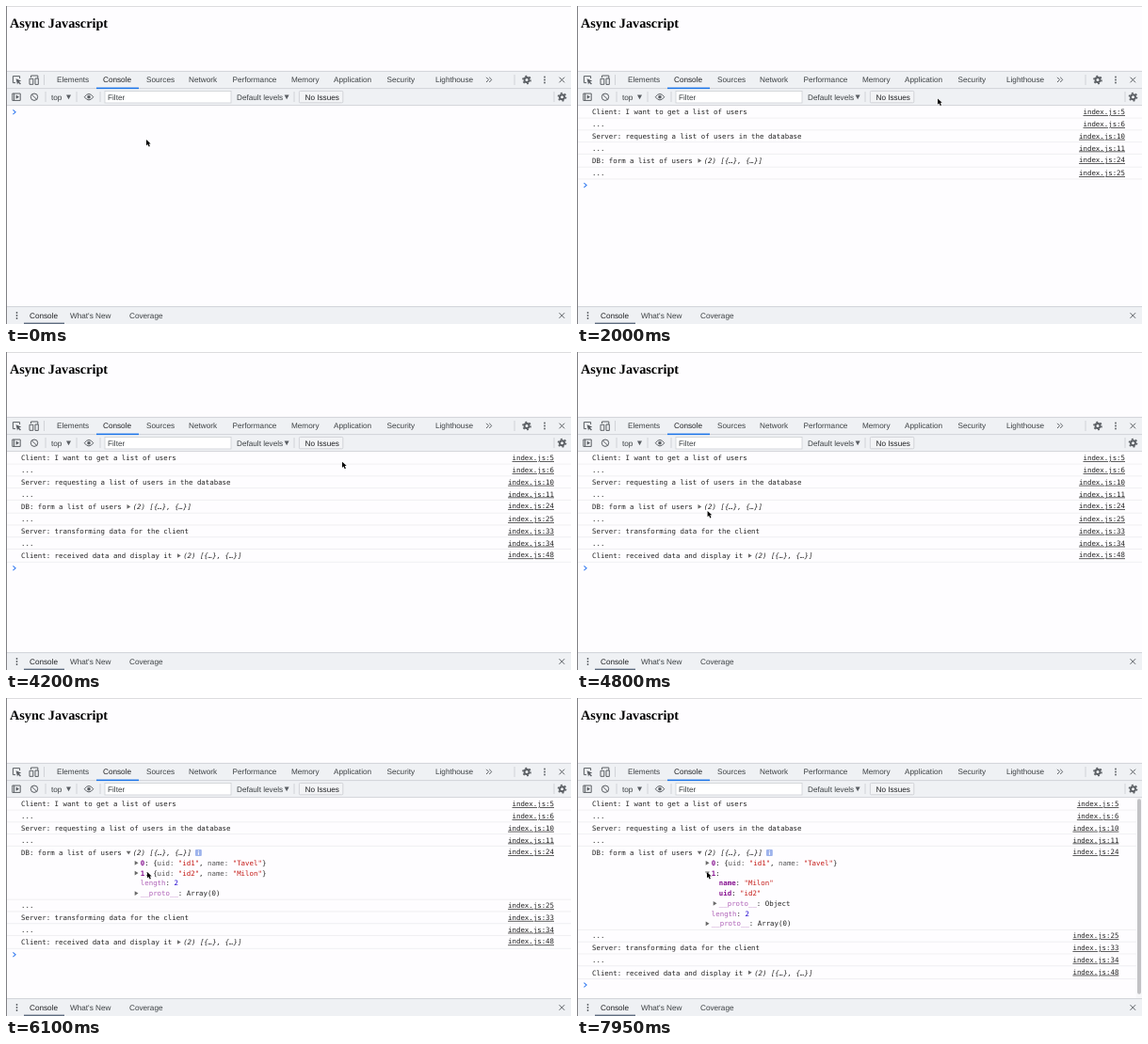
Recreate the animation shown at these times as an HTML page. Size 600 px wide and 338 px high, loop 8 s.

```html
<!DOCTYPE html>
<html lang="en">
<head>
<meta charset="utf-8">
<title>Async Javascript</title>
<style>
  html, body { margin: 0; width: 100%; height: 100%; overflow: hidden; background: #fefdff; }
  svg { display: block; width: 600px; height: 338px; }
  text { white-space: pre; text-rendering: geometricPrecision; }
  .ui { font: 8.2px "Liberation Sans", Arial, sans-serif; fill: #3c4043; }
  .ui .on { fill: #202124; }
  .mono { font: 7.4px "DejaVu Sans Mono", monospace; fill: #242424; }
  .it { font-style: italic; }
  .key { fill: #881391; font-weight: bold; }
  .dim { fill: #b064b8; }
  .sub { fill: #565656; }
  .str { fill: #c41a16; }
  .num { fill: #1c00cf; }
  .link { text-anchor: end; text-decoration: underline; }
  .icon { fill: none; stroke: #5a5e63; stroke-width: 1; }
  .solid { fill: #5a5e63; }
  .rule { stroke: #c9ccd1; stroke-width: .8; }
</style>
</head>
<body>
<svg viewBox="0 0 600 338">
  <rect width="600" height="338" fill="#fefdff"/>
  <rect width="600" height="1" fill="#dcdcde"/>
  <text x="4" y="23" font-family="'Liberation Serif', Times, serif" font-weight="bold" font-size="14.25">Async Javascript</text>
  <g id="log" class="mono"></g>
  <g id="chrome" class="ui"></g>
  <rect width="1" height="338" fill="#808084"/>
  <g id="pointer"></g>
</svg>
<script>
const LOOP = 8000, OPEN_ARRAY = 5300, OPEN_ITEM = 7400;
const $ = id => document.getElementById(id);

// Toolbars
const label = (x, y, s, cls = '') => `<text x="${x}" y="${y}" class="${cls}">${s}</text>`;
const box = (x, y, w, h, fill, extra = '') => `<rect x="${x}" y="${y}" width="${w}" height="${h}" fill="${fill}" ${extra}/>`;
const icon = (d, extra = '') => `<path class="icon" d="${d}" ${extra}/>`;
const solid = d => `<path class="solid" d="${d}"/>`;
const rule = (x, y1, y2) => `<path class="rule" d="M${x} ${y1}V${y2}"/>`;
const edge = y => `<path class="rule" d="M0 ${y}H600"/>`;
const cross = y => icon(`M587.5 ${y - 2.8}l5.6 5.6m0 -5.6l-5.6 5.6`);
const dots = (x, y) => [-3, 0, 3].map(d => `<circle class="solid" cx="${x}" cy="${y + d}" r=".9"/>`).join('');
const drop = (x, y) => solid(`M${x} ${y}h5l-2.5 4.6z`);
const gear = (x, y) =>
  `<circle class="icon" cx="${x}" cy="${y}" r="2.5" stroke-width="1.9" style="stroke-width:1.9"/>` +
  `<circle class="icon" cx="${x}" cy="${y}" r="4.1" style="stroke-width:1.5" stroke-dasharray="1.9 2.394"/>`;

const tabs = [[54, 'Elements'], [103, 'Console'], [149, 'Sources'], [194, 'Network'], [240.5, 'Performance'],
  [303, 'Memory'], [348, 'Application'], [404.5, 'Security'], [456, 'Lighthouse']];

$('chrome').innerHTML =
  box(0, 69, 600, 36.5, '#eff1f4') + edge(69.4) + edge(87.6) + edge(105.6) +
  `<rect id="hover" x="449" y="70" width="54" height="17.3" fill="#dfe1e4"/>` +
  tabs.map(([x, s]) => label(x, 81.2, s, s === 'Console' ? 'on' : '')).join('') +
  box(96, 86.6, 45, 1.5, '#1a73e8') +
  icon('M14.6 77v-2.4h-7.2v7h2.6') + solid('M10.6 77.3l5.6 2.2-2.3 .9 2 2-1 1-2-2-.9 2z') +
  icon('M26.5 76v-2h7.3v3M25 77.3h3.8v6h-3.8zM31 77h3.3v6.4h-3.3z') +
  rule(40.5, 73, 84) +
  icon('M510 75.8l2.6 2.6-2.6 2.6m3.2-5.2l2.6 2.6-2.6 2.6') +
  rule(540, 73, 84) + gear(553, 78.5) + dots(572, 78.5) + cross(78.5) +
  icon('M6.8 93h8.4v7.4h-8.4zM8.6 93v7.4') + solid('M10.6 94.6l3.4 2.1-3.4 2.1z') +
  '<circle class="icon" cx="30" cy="96.7" r="3.7"/>' + icon('M27.4 94.1l5.2 5.2') +
  rule(42, 91, 102) + label(48, 99.5, 'top') + drop(64, 94.6) + rule(75, 91, 102) +
  icon('M83.2 96.7q4.8 -6.4 9.6 0q-4.8 6.4 -9.6 0z') + '<circle class="solid" cx="88" cy="96.7" r="1.8"/>' +
  rule(100, 91, 102) + box(105, 90.4, 134, 12.6, '#fff', 'stroke="#cdd0d4" stroke-width=".8"') +
  label(108, 99.6, 'Filter') + label(245, 99.5, 'Default levels') + drop(295.6, 94.6) + rule(306, 91, 102) +
  box(311.4, 90.4, 46.4, 12.4, '#f3f4f6', 'stroke="#c9ccd1" stroke-width=".8" rx="1"') +
  label(317.5, 99.5, 'No Issues', 'on') + rule(582, 91, 102) + gear(590.5, 96.7) +
  box(0, 319, 600, 19, '#eff1f4') + edge(319.6) +
  dots(11.5, 329) + label(25, 332, 'Console', 'on') + label(68, 332, "What's New") + label(131, 332, 'Coverage') +
  box(19, 336.6, 43, 1.4, '#5f6d80') + cross(329);

// Console messages: time, text, source line, logs an array
const logs = [
  [250, 'Client: I want to get a list of users', 5],
  [250, '...', 6],
  [1200, 'Server: requesting a list of users in the database', 10],
  [1200, '...', 11],
  [1700, 'DB: form a list of users ', 24, true],
  [1700, '...', 25],
  [2200, 'Server: transforming data for the client', 33],
  [2200, '...', 34],
  [3250, 'Client: received data and display it ', 48, true]
];
const ADVANCE = 4.455, LINE = 10.75;
const span = (cls, s) => `<tspan class="${cls}">${s}</tspan>`;
const arrow = (x, y, open) =>
  `<path fill="#6a6a6a" d="M${x} ${y}${open ? 'm-2.4 -1.7h4.8l-2.4 3.8z' : 'm-1.7 -2.3v4.6l3.8 -2.3z'}"/>`;
const user = (i, name) =>
  span('key', i) + ': {' + span('sub', 'uid: ') + span('str', `"id${i + 1}"`) + ', ' +
  span('sub', 'name: ') + span('str', `"${name}"`) + '}';
const proto = type => span('dim', '__proto__') + ': ' + type;

// Property lines: depth, markup, arrow (undefined: none)
function properties(itemOpen) {
  const item = itemOpen ? [
    [0, span('key', '1') + ':', true],
    [1, span('key', 'name') + ': ' + span('str', '"Milon"')],
    [1, span('key', 'uid') + ': ' + span('str', '"id2"')],
    [1, proto('Object'), false]
  ] : [[0, user(1, 'Milon'), false]];
  return [
    [0, user(0, 'Tavel'), false], ...item,
    [0, span('dim', 'length') + ': ' + span('num', '2')],
    [0, proto('Array(0)'), false]
  ];
}

function drawLog(count, arrayOpen, itemOpen) {
  const right = itemOpen ? 575.4 : 582;
  let y = 106.3, out = '';
  logs.slice(0, count).forEach(([, text, line, array], i) => {
    const base = y + (array ? 9.8 : 8.9);
    out += label(16, base, text) + label(right, y + 8.9, 'index.js:' + line, 'link');
    let height = array ? 13.8 : 12.77;
    if (array) {
      const x = 16 + text.length * ADVANCE, open = i === 4 && arrayOpen;
      out += arrow(x + 2.8, base - 2.8, open) + label(x + 7.3, base, '(2) [{…}, {…}]', 'it');
      if (open) {
        out += box(201, base - 6.1, 6.8, 6.8, '#9db3ec', 'rx="1"') +
          `<path d="M204.4 ${base - 3.5}v3.2m0 -5v1" stroke="#fff" stroke-width="1"/>`;
        properties(itemOpen).forEach(([depth, markup, state], n) => {
          const px = 142.8 + depth * 8, py = base + (n + 1) * LINE;
          if (state !== undefined) out += arrow(px - 4.4, py - 2.6, state);
          out += label(px, py, markup);
          height += LINE;
        });
      }
    }
    y += height;
    out += `<path d="M1 ${y}H600" stroke="#ececef" stroke-width=".8"/>`;
  });
  out += `<path d="M7.4 ${y + 4.1}l2.7 2.4-2.7 2.4" fill="none" stroke="#367cf1" stroke-width="1.1"/>`;
  if (itemOpen) out += box(593.6, 106, 6.4, 213, '#f8f8fa') + box(595, 107.3, 4, 207.5, '#c2c2c5', 'rx="2"');
  $('log').innerHTML = out;
}

// Pointer stops: time, x, y
const stops = [
  [1200, 149, 142], [1500, 322, 110], [1650, 322, 110], [2400, 457, 84.5], [3200, 457, 84.5],
  [3600, 406, 95.5], [3700, 406, 95.5], [4050, 360, 115.5], [4150, 360, 115.5], [4200, 357, 116.7],
  [4650, 152, 180], [4900, 131.5, 163], [5000, 131.5, 163], [5100, 132, 163.5], [5300, 132, 163.5],
  [5750, 146, 176], [6100, 150, 185], [6500, 155, 186], [7000, 143, 187], [7300, 138, 185]
];
function pointerAt(t) {
  const i = stops.findIndex(s => s[0] > t);
  if (i < 1) return (i ? stops[stops.length - 1] : stops[0]).slice(1);
  const [t0, x0, y0] = stops[i - 1], [t1, x1, y1] = stops[i];
  const u = (t - t0) / (t1 - t0), e = u * u * (3 - 2 * u);
  return [x0 + (x1 - x0) * e, y0 + (y1 - y0) * e];
}
const shapes = {
  arrow: '<path d="M0 0v6.3l1.5-1.4 1.2 2.6 1.2-.5-1.2-2.6h2z" fill="#000" stroke="#fff" stroke-width=".9" paint-order="stroke"/>',
  beam: '<path d="M-1.6 -4.6q1.6 0 1.6 1.2q0 -1.2 1.6 -1.2M0 -3.4v6.8M-1.6 4.6q1.6 0 1.6 -1.2q0 1.2 1.6 1.2" fill="none" stroke="#222" stroke-width=".8"/>',
  hand: '<path d="M-.8 .6q.7 -.9 1.3 0v2.2l2.6 .5q.9 .3 .8 1.2l-.6 2.9h-3.4l-2.2 -2.9q.2 -.9 1.5 0z" fill="#fff" stroke="#111" stroke-width=".8"/>'
};

let logKey, shapeKey;
function render(t) {
  const count = logs.filter(l => l[0] <= t).length;
  const state = [count, t >= OPEN_ARRAY, t >= OPEN_ITEM];
  if (logKey !== String(state)) {
    logKey = String(state);
    drawLog(...state);
  }
  const [x, y] = pointerAt(t);
  const overTab = x > 449 && x < 503 && y < 87.5;
  const shape = overTab ? 'hand' : t >= 250 && t < 1200 ? 'beam' : 'arrow';
  if (shapeKey !== shape) {
    shapeKey = shape;
    $('pointer').innerHTML = shapes[shape];
  }
  $('hover').style.display = overTab ? '' : 'none';
  $('pointer').setAttribute('transform', `translate(${x} ${y})`);
}

const start = performance.now();
function tick() {
  render((performance.now() - start) % LOOP);
  requestAnimationFrame(tick);
}
tick();
</script>
</body>
</html>
```
